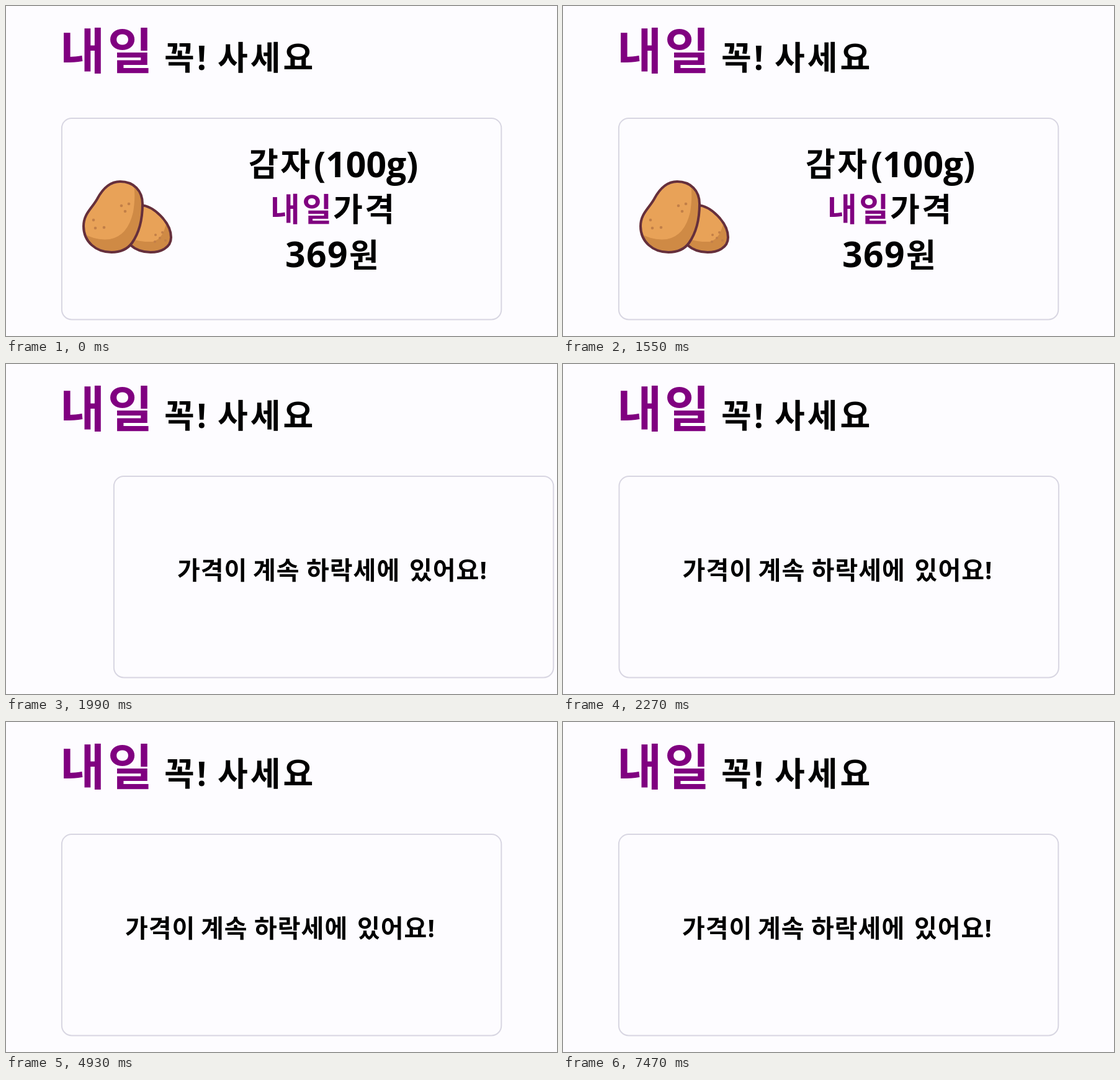
Animation of 888x532 px, one loop 8000 ms. Source, as an HTML page:

```html
<!DOCTYPE html>
<html lang="ko">
<head>
<meta charset="utf-8">
<title>내일 꼭! 사세요</title>
<style>
  html, body { margin: 0; width: 100%; height: 100%; overflow: hidden; background: #fdfcff; }
  svg { display: block; width: 100vw; height: 100vh; }
  text {
    font-family: "Open Sans", "Noto Sans CJK KR", "Noto Sans CJK", sans-serif;
    font-weight: 700;
    fill: #000;
  }
  .accent { fill: #800080; }
  .day { font-size: 79px; letter-spacing: 4px; }
  .title { font-size: 53px; letter-spacing: 4px; }
  .line { font-size: 52px; letter-spacing: 3.5px; }
  .line .num { font-size: 57px; letter-spacing: 0; }
  .line .price { letter-spacing: 1.5px; }
  .note { font-size: 40px; letter-spacing: 1px; }
  .frame { fill: none; stroke: #d8d6e2; stroke-width: 2; }
  .skin { fill: #e8a258; }
  .shade { fill: #cf8a45; }
  .edge { fill: none; stroke: #652f3c; stroke-width: 4; stroke-linejoin: round; }
  .spots { fill: #c27f48; }
</style>
</head>
<body>
<svg viewBox="0 0 888 532">
  <defs>
    <rect id="card" class="frame" x="89.9" y="180.9" width="708.4" height="324.6" rx="16"/>
    <path id="big" d="M184 283C206 283 220 298 220 319C220 342 215 365 203 382C195 393 184 397 170 397C145 397 125 380 125 355C125 335 138 327 147 311C156 294 167 283 184 283Z"/>
    <path id="small" d="M217 321C238 322 266 349 266 373C266 390 249 397 233 397C220 397 209 393 200 385C212 370 218 347 217 321Z"/>
    <clipPath id="bigClip"><use href="#big"/></clipPath>
    <clipPath id="smallClip"><use href="#small"/></clipPath>
  </defs>

  <text y="102"><tspan class="day accent" x="87">내일</tspan></text>
  <text class="title" y="103"><tspan x="255">꼭!</tspan><tspan x="341">사세요</tspan></text>

  <g id="track">
    <use href="#card"/>
    <g>
      <use href="#small" class="skin"/>
      <path class="shade" clip-path="url(#smallClip)" d="M190 372Q216 381 236 380Q254 376 259 346L280 350V405H190Z"/>
      <use href="#small" class="edge"/>
      <use href="#big" class="skin"/>
      <path class="shade" clip-path="url(#bigClip)" d="M118 362Q140 379 167 376Q196 371 205 332Q209 306 206 288L230 280V405H118Z"/>
      <use href="#big" class="edge"/>
      <g class="spots">
        <circle cx="186" cy="322" r="2.3"/><circle cx="198" cy="319" r="2.3"/><circle cx="192" cy="331" r="2.3"/>
        <circle cx="141" cy="345" r="2.3"/><circle cx="144" cy="358" r="2.3"/><circle cx="158" cy="357" r="2.3"/>
        <circle cx="241" cy="369" r="2"/><circle cx="252" cy="365" r="2"/><circle cx="248" cy="374" r="2"/>
        <circle cx="240" cy="380" r="2"/><circle cx="257" cy="378" r="2"/>
      </g>
    </g>
    <text class="line" y="274"><tspan x="391">감자</tspan><tspan class="num" x="496" y="276">(100g)</tspan></text>
    <text class="line" y="347"><tspan class="accent" x="426">내일</tspan><tspan x="527">가격</tspan></text>
    <text class="line" y="420"><tspan class="num price" x="450" y="421">369</tspan><tspan x="553">원</tspan></text>

    <g transform="translate(888)">
      <use href="#card"/>
      <text class="note" y="347"><tspan x="192">가격이</tspan><tspan x="314">계속</tspan><tspan x="400">하락세에</tspan><tspan x="566">있어요!</tspan></text>
    </g>
  </g>
</svg>
<script>
  const LOOP = 8000, START = 1570, PITCH = 888, SLIDE = 300, LEAD = 39.5;
  const track = document.getElementById("track");

  // cubic-bezier(.25, .1, .25, 1)
  function ease(x) {
    let lo = 0, hi = 1;
    for (let i = 0; i < 24; i++) {
      const s = (lo + hi) / 2;
      if (0.75 * s * (1 - s) + s ** 3 < x) lo = s; else hi = s;
    }
    const s = lo, r = 1 - s;
    return 0.3 * r * r * s + 3 * r * s * s + s ** 3;
  }

  // The slide advances in bursts: holds of 100, 20 and 20 ms, each worth 1/60 s.
  function shift(t) {
    if (t < START) return 0;
    const cycle = Math.floor((t - START) / 140);
    const rest = (t - START) % 140;
    const step = 3 * cycle + (rest < 100 ? 0 : rest < 120 ? 1 : 2);
    return PITCH * ease(Math.min(1, (LEAD + step * 50 / 3) / SLIDE));
  }

  function draw(now) {
    track.setAttribute("transform", `translate(${-shift(now % LOOP).toFixed(2)})`);
    requestAnimationFrame(draw);
  }
  draw(performance.now());
</script>
</body>
</html>
```
